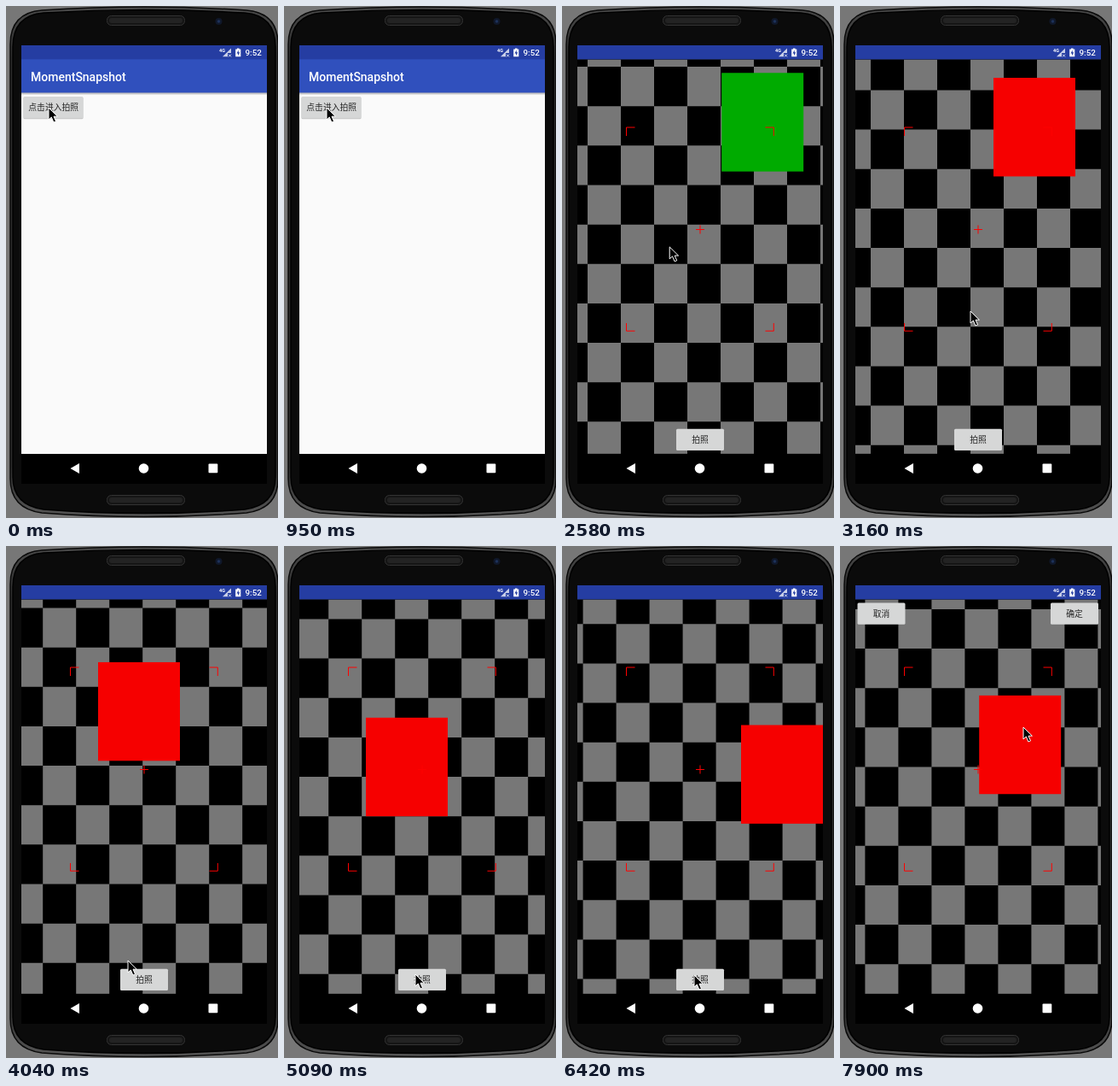
An HTML page that plays this animation: 319 px wide and 599 px high, repeating every 8000 ms.

```html
<!DOCTYPE html>
<html lang="zh">
<head>
<meta charset="utf-8">
<title>Camera preview</title>
<style>
  html, body { margin: 0; width: 100%; height: 100%; overflow: hidden; background: #777; }
  body > svg { display: block; width: 100%; height: 100%; }
  text { font-family: Roboto, "Noto Sans CJK SC", "Noto Sans CJK", sans-serif; }
  .button rect { fill: #d6d7d7; }
  .button text { font-size: 9.8px; fill: #222; text-anchor: middle; }
</style>
</head>
<body>
<svg viewBox="0 0 319 599">
  <defs>
    <linearGradient id="shade" x2="0" y2="1">
      <stop stop-color="#000" stop-opacity=".3"/>
      <stop offset="1" stop-color="#000" stop-opacity="0"/>
    </linearGradient>
    <linearGradient id="rim" x2="0" y2="1">
      <stop stop-color="#4a4a4a"/>
      <stop offset=".1" stop-color="#2c2c2c"/>
      <stop offset=".9" stop-color="#2c2c2c"/>
      <stop offset="1" stop-color="#555"/>
    </linearGradient>
    <g id="speaker">
      <rect x="118.5" y=".5" width="91" height="11" rx="5" fill="#151515" stroke="#333"/>
      <rect x="121" y="3" width="86" height="6" rx="3" fill="#232323"/>
    </g>
  </defs>

  <!-- phone -->
  <path d="M5 45Q5 8 42 5Q162 -3 282 5Q319 8 319 45V553Q319 588 282 593Q162 602 42 593Q5 588 5 553Z"
        fill="url(#rim)" stroke="#0a0a0a" stroke-width="1.5"/>
  <path d="M8 48Q8 11 44 8Q162 1 280 8Q316 11 316 48V551Q316 584 280 589Q162 598 44 589Q8 584 8 551Z"
        fill="#0b0b0b" stroke="#000" stroke-width="1.5"/>
  <use href="#speaker" y="11"/>
  <use href="#speaker" y="572"/>
  <circle cx="249.500" cy="18" r="4" fill="#10182a"/>
  <circle cx="249.500" cy="18" r="1.800" fill="#1d3159"/>
  <rect x="18" y="524" width="288" height="35"/>
  <g fill="#fff">
    <path d="M75.500 541L86 535V547Z"/>
    <circle cx="161.500" cy="541" r="5.800"/>
    <rect x="237.500" y="535.500" width="10.800" height="10.800" rx="1"/>
  </g>

  <!-- start screen -->
  <g id="home">
    <rect x="18" y="62" width="288" height="462" fill="#fafafa"/>
    <rect x="18" y="62" width="288" height="39.500" fill="#3050bd"/>
    <rect x="18" y="101.500" width="288" height="3" fill="url(#shade)"/>
    <text x="29" y="87.700" font-size="14" font-weight="500" fill="#fff">MomentSnapshot</text>
    <g class="button">
      <rect x="20.500" y="106.500" width="70" height="25.700" rx="1.500" style="fill:#c4c4c4"/>
      <rect id="enter" x="20.500" y="106" width="70" height="25.200" rx="1.500"/>
      <text x="55.700" y="122.300">点击进入拍照</text>
    </g>
  </g>

  <!-- camera screen -->
  <g id="camera">
    <svg x="18" y="62.400" width="288" height="461.600">
      <rect width="288" height="462"/>
      <g id="video" transform="matrix(0 .721 -.6 0 288 0)">
        <rect width="640" height="480" fill="#777"/>
        <path id="checks"/>
        <rect id="square" width="160" height="160"/>
      </g>
    </svg>
    <path d="M75.500 152V142H85.500M238.500 142H248.300V152M75.500 371V380.200H85.500M238.500 380.200H248.300V371M157 261.500H167M162 256.500V266.500"
          fill="none" stroke="#f00"/>
    <g id="shoot" class="button">
      <rect x="134" y="494.800" width="56" height="25.200" rx="1.500"/>
      <text x="162" y="511">拍照</text>
    </g>
    <g id="confirm" class="button">
      <rect x="20.500" y="66.500" width="56" height="25.200" rx="1.500"/>
      <text x="48.500" y="82.700">取消</text>
      <rect x="247" y="66.500" width="56" height="25.200" rx="1.500"/>
      <text x="275" y="82.700">确定</text>
    </g>
  </g>

  <!-- status bar -->
  <rect x="18" y="46" width="288" height="16.400" fill="#253da2"/>
  <g fill="#fff">
    <text x="250" y="53.500" font-size="5.500" font-weight="700">4G</text>
    <path d="M254 59.300L264 49.500V55H260V59.300Z" opacity=".75"/>
    <path d="M261 56.500L264 59.500M264 56.500L261 59.500" stroke="#fff" stroke-width=".8"/>
    <path d="M271 49.500H273.500V50.500H275.300V59.300H269.200V50.500H271Z"/>
    <path d="M272.700 51.500L270.500 55.500H272V58.300L274.200 54.300H272.700Z" fill="#253da2"/>
    <text x="280.500" y="58" font-size="9.800" font-weight="500">9:52</text>
  </g>

  <path id="cursor" d="M0 0V14L3.300 11L5.900 17L8.500 15.900L6 10.200H10.400Z" stroke="#fff" stroke-width="1"/>
</svg>
<script>
const LOOP = 8000, OPEN = 1400, SHOT = 7010, CONFIRM = 7160;
const $ = id => document.getElementById(id);

// The screen refreshes every 150 ms; a few refreshes last only 140 ms.
const shortSteps = new Set([7, 9, 15, 17, 19, 21, 31, 38, 42, 46]);
const steps = [0];
for (let time = 500, k = 0; time < LOOP; time += shortSteps.has(k++) ? 140 : 150) steps.push(time);

// Cursor stops: time, x, y
const route = [
  [0, 50, 119], [1250, 50, 119], [1840, 92, 186], [3160, 153, 357], [4040, 143, 485],
  [4340, 154, 501], [5090, 154, 501], [6420, 155, 502], [7450, 155, 502], [7900, 215, 212]
];

function cursorAt(time) {
  const next = route.findIndex(stop => stop[0] > time);
  if (next < 0) return route.at(-1).slice(1);
  const [t0, x0, y0] = route[next - 1], [t1, x1, y1] = route[next];
  const part = (time - t0) / (t1 - t0);
  return [x0 + (x1 - x0) * part, y0 + (y1 - y0) * part];
}

// Triangle wave between 0 and 128
function bounce(n) {
  n &= 255;
  return n > 128 ? 255 - n : n;
}

// The video is 640 x 480, turned by a quarter.
function drawVideo(count) {
  const x = 3 * count, y = count;
  const left = 2 * Math.ceil((64 - x % 64) / 2) - 64, top = -(y % 64);
  const parity = (x >> 6) + (y >> 6);
  let d = '';
  for (let row = 0; row < 9; row++)
    for (let col = 0; col < 11; col++)
      if ((parity + row + col) % 2 === 0)
        d += `M${left + col * 64} ${top + row * 65}h64v65h-64z`;
  $('checks').setAttribute('d', d);
  $('square').setAttribute('x', bounce(3 * count) * 2);
  $('square').setAttribute('y', bounce(5 * count) * 2);
  $('square').setAttribute('fill', count & 256 ? '#f60000' : '#00ab00');
}

const show = (id, on) => $(id).style.display = on ? '' : 'none';

function render() {
  const now = performance.now() % LOOP;
  const time = steps.findLast(step => step <= now);
  show('home', time < OPEN);
  show('camera', time >= OPEN);
  show('video', time > OPEN);
  show('shoot', time < CONFIRM);
  show('confirm', time >= CONFIRM);
  $('enter').style.fill = time < 500 || time >= 950 ? '' : time < 650 ? '#cbcccc' : '#c2c3c3';
  drawVideo(Math.floor(242.4 + (Math.min(time, SHOT) - 1840) * 0.0142));
  $('cursor').setAttribute('transform', `translate(${cursorAt(time)})`);
  requestAnimationFrame(render);
}
render();
</script>
</body>
</html>
```
